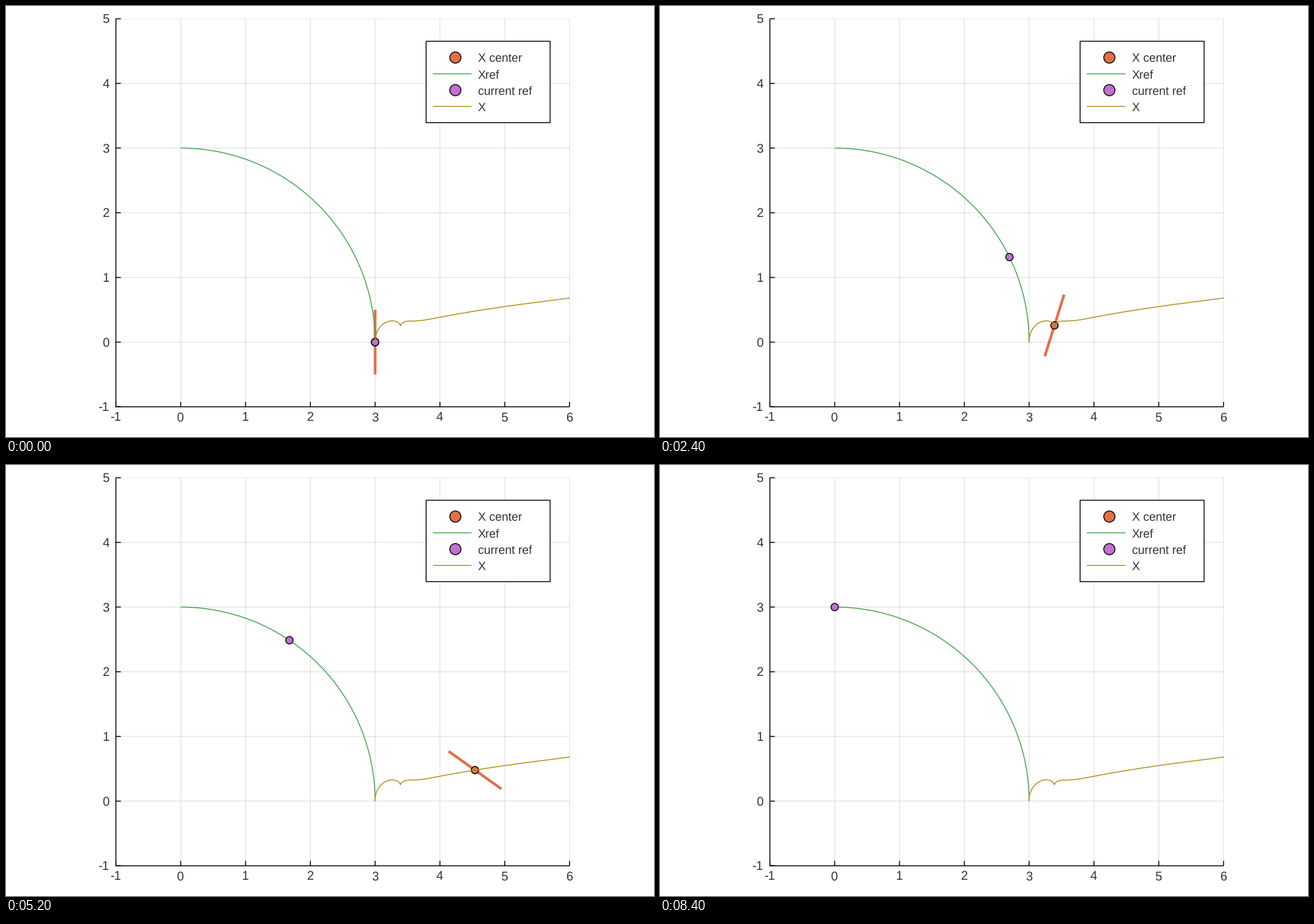
A matplotlib script for the animation above (8420 ms loop, 917 by 611 pixels).

```python
import matplotlib.pyplot as plt
import numpy as np
from matplotlib.animation import FuncAnimation
from matplotlib.patches import Circle, Rectangle

W, H, DPI = 917, 611, 64
PT = 72 / DPI                      # points per pixel
LEFT, RIGHT, TOP, BOTTOM = 155.5, 797.5, 18.0, 568.2
ORANGE, GREEN, PURPLE, GOLD = "#e26f46", "#3da44d", "#c271d2", "#ac8d18"
STEPS = 180
THIN = 1.3

TURN = 3.796                       # turning rate, degrees per step
STOP = 48.1                        # step at which the vehicle reverses
BRAKE, PULL = .00053, .000593      # deceleration before, acceleration after

plt.rcParams["font.family"] = "Liberation Sans"
plt.rcParams["text.hinting"] = "none"


def px(x):
    return LEFT + (np.asarray(x) + 1) * (RIGHT - LEFT) / 7


def py(y):
    return BOTTOM - (np.asarray(y) + 1) * (BOTTOM - TOP) / 6


def drive(t):
    """Positions of a vehicle that turns at full rate, brakes and backs off."""
    speed = np.where(t < STOP, BRAKE, PULL) * (STOP - t)
    course = np.where(t < 71.4, 90 - TURN * t,
                      np.interp(t, [71.4, 90, 130], [-181, -168.7, -172.6]))
    course = np.radians(course)
    x = 3 + np.cumsum(speed * np.cos(course))
    y = np.cumsum(speed * np.sin(course))
    return np.r_[3, x[:-1]], np.r_[0, y[:-1]]


def bar_angle(t, brake=77, tau=3.5):
    """Steady clockwise turn that settles exponentially."""
    late = np.maximum(t - brake, 0)
    turned = np.minimum(t, brake) + tau * (1 - np.exp(-late / tau))
    return np.radians(90 - TURN * turned)


steps = np.arange(STEPS + 1)
xs, ys = drive(steps)
tilt = bar_angle(steps)
ref = np.radians(steps / 2)
ref_x, ref_y = 3 * np.cos(ref), 3 * np.sin(ref)

fig = plt.figure(figsize=(W / DPI, H / DPI), dpi=DPI, facecolor="white")
ax = fig.add_axes([0, 0, 1, 1])
ax.set_xlim(0, W)
ax.set_ylim(H, 0)
ax.axis("off")

frame = Rectangle((LEFT, TOP), RIGHT - LEFT, BOTTOM - TOP,
                  transform=ax.transData)


def line(x, y, color, z, width=THIN, clip=False, **kw):
    art, = ax.plot(x, y, color=color, lw=width * PT, zorder=z, snap=False,
                   solid_capstyle="butt", **kw)
    if clip:
        art.set_clip_path(frame)
    return art


def dot(x, y, r, color, z, clip=False):
    art = ax.add_patch(Circle((x, y), r, fc=color, ec="black",
                              lw=THIN * PT, zorder=z))
    if clip:
        art.set_clip_path(frame)
    return art


def label(x, y, text, ha, size):
    ax.text(x, y, text, ha=ha, va="baseline", size=size * PT,
            color="#333333", zorder=12)


# grid, ticks and axes
for v in range(-1, 7):
    x = px(v)
    line([x, x], [TOP, BOTTOM], "black", 1, alpha=.1, clip=True)
    line([x, x], [BOTTOM, BOTTOM - 7], "black", 2)
    label(x - .6, 588.5, str(v), "center", 17.6)
for v in range(-1, 6):
    y = py(v)
    line([LEFT, RIGHT], [y, y], "black", 1, alpha=.1, clip=True)
    line([LEFT, LEFT + 7], [y, y], "black", 2)
    label(146, y + 6.3, str(v), "right", 17.6)
line([LEFT, LEFT], [TOP, BOTTOM + THIN / 2], "black", 2)
line([LEFT, RIGHT], [BOTTOM, BOTTOM], "black", 2)

# series
bar = line([], [], ORANGE, 3, width=3.8, clip=True)
center = dot(0, 0, 5.2, ORANGE, 4, clip=True)
line(px(ref_x), py(ref_y), GREEN, 5, clip=True)
target = dot(0, 0, 5.2, PURPLE, 6, clip=True)
line(px(xs), py(ys), GOLD, 7, clip=True)

# legend
ax.add_patch(Rectangle((594.5, 50), 175.5, 115.4, fc="white", ec="black",
                       lw=THIN * PT, zorder=10, snap=False))
rows = [("X center", ORANGE, True), ("Xref", GREEN, False),
        ("current ref", PURPLE, True), ("X", GOLD, False)]
for k, (name, color, is_dot) in enumerate(rows):
    y = 73.1 + 23.1 * k
    if is_dot:
        dot(635.9, y, 7.9, color, 11)
    else:
        line([604, 658.7], [y, y], color, 11)
    label(667.6, y + 6.2, name, "left", 16.8)


def step_at(tick):
    # three steps per 140 ms, the middle one held for 100 ms
    cycle, rest = divmod(tick, 7)
    return 3 * cycle + (rest + 4) // 5


def update(tick):
    i = step_at(tick)
    dx, dy = np.cos(tilt[i]) / 2, np.sin(tilt[i]) / 2
    bar.set_data(px([xs[i] - dx, xs[i] + dx]), py([ys[i] - dy, ys[i] + dy]))
    center.center = px(xs[i]), py(ys[i])
    target.center = px(ref_x[i]), py(ref_y[i])
    return bar, center, target


anim = FuncAnimation(fig, update, frames=421, interval=20,
                     repeat=True, repeat_delay=0)
plt.show()
```
